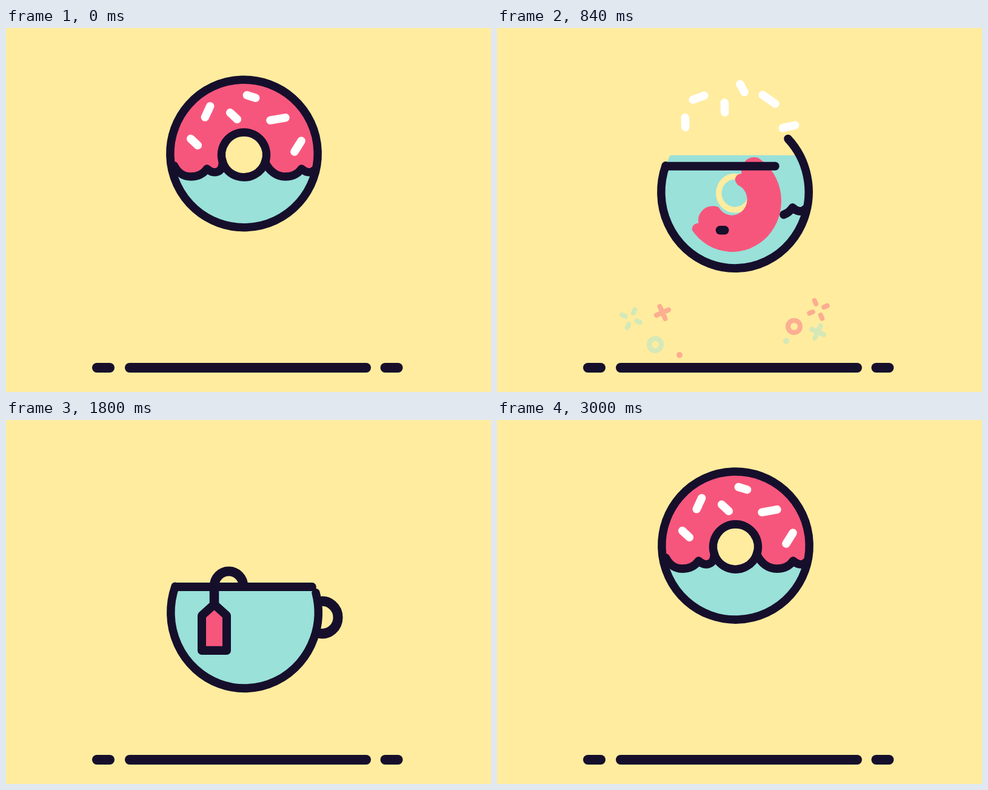
Write an HTML page with a canvas that moves like this. It is 800 px wide and 600 px high and loops after 3040 ms.

```html
<!DOCTYPE html>
<html lang="en">
<head>
<meta charset="utf-8">
<title>Donut and teacup</title>
<style>
html, body { margin: 0; width: 100%; height: 100%; overflow: hidden; background: #ffec9f; }
canvas { display: block; }
</style>
</head>
<body>
<canvas id="stage" width="800" height="600"></canvas>
<script>
const ctx = document.getElementById('stage').getContext('2d');
const BG = '#ffec9f', INK = '#160f2c', PINK = '#f7567c', MINT = '#99e1d9';
const LOOP = 3040, HALF = 1520, RAD = Math.PI / 180, R = 121.7;

const clamp = v => Math.max(0, Math.min(1, v));
const ramp = (t, from, to) => clamp((t - from) / (to - from));
const easeOut = u => 1 - (1 - u) ** 2;

// piecewise linear curve through [time, value] pairs
function curve(t, keys) {
  for (let i = 1; i < keys.length; i++) {
    const [a, va] = keys[i - 1], [b, vb] = keys[i];
    if (t < b) return va + (vb - va) * clamp((t - a) / (b - a));
  }
  return keys[keys.length - 1][1];
}

const icingEdge = `M118 26L112 30Q104 33 95 25C88 35 79 38 68 38C55 38 42 30 35 14
  A37 37 0 1 0 -35 14Q-36 28 -44 30Q-52 33 -61 25C-68 35 -77 38 -88 38C-97 38 -108 34 -115 20`;
const icingLine = new Path2D(icingEdge);
const icingFill = new Path2D(icingEdge + 'A119 119 0 1 1 118 26Z');
const tag = new Path2D('M-29.5 61H-70.5V5L-50 -13L-29.5 5Z');
const string = new Path2D('M-50 -13V-42A24 24 0 0 1 -2 -42');
const handle = new Path2D('M123.5 -17.6A26 26 0 1 1 123.5 33.6');

// x, y, angle, half length, extra jump height
const sprinkles = [
  [-82, -19, 43, 8, 20], [-60, -69, 115, 10, 10], [-17, -62, 43, 8, 0],
  [12, -94, 17, 7.5, 0], [56, -57, -10, 12.7, 20], [89, -12, 122, 10.5, 20]
];

// kind, colour, spin, start angle, then x and y at 80, 440 and 520 ms after impact
const confetti = [
  ['burst', MINT, -1, -12, 284, 221, 207, 512, 479, 482],
  ['cross', PINK, -1, 31, 316, 273, 259, 531, 469, 467],
  ['ring', MINT, 0, 0, 289, 261, 254, 546, 522, 523],
  ['dot', PINK, 0, 0, 331, 301, 296, 555, 539, 536],
  ['cross', MINT, 1, -31, 459, 529, 544, 537, 501, 505],
  ['burst', PINK, 1, 12, 480, 530, 545, 527, 464, 460],
  ['ring', PINK, 0, 0, 444, 490, 503, 537, 492, 491],
  ['dot', MINT, 0, 0, 433, 477, 488, 548, 516, 517]
];

function parabola(s, a, b, c) {
  const d1 = (b - a) / 360, d2 = ((c - b) / 80 - d1) / 440;
  return a + (s - 80) * (d1 + d2 * (s - 440));
}

function line(x1, y1, x2, y2, width, color) {
  ctx.beginPath();
  ctx.moveTo(x1, y1);
  ctx.lineTo(x2, y2);
  ctx.lineWidth = width;
  ctx.strokeStyle = color;
  ctx.stroke();
}

function disc(x, y, r, color) {
  ctx.beginPath();
  ctx.arc(x, y, r, 0, 7);
  ctx.fillStyle = color;
  ctx.fill();
}

// strokes the first part of a path
function trace(path, length, part, width) {
  if (part <= 0) return;
  ctx.lineWidth = width;
  ctx.strokeStyle = INK;
  ctx.setLineDash(part < 1 ? [length * part, 2000] : []);
  ctx.stroke(path);
  ctx.setLineDash([]);
}

function drawConfetti(s) {
  if (s < 0 || s > 660) return;
  ctx.save();
  ctx.beginPath();
  ctx.rect(0, 0, 800, 553);
  ctx.clip();
  ctx.globalAlpha = clamp((660 - s) / 530);
  for (const [kind, color, spin, angle, xa, xb, xc, ya, yb, yc] of confetti) {
    ctx.save();
    ctx.translate(parabola(s, xa, xb, xc), parabola(s, ya, yb, yc));
    ctx.rotate((angle + spin * 0.153 * (s - 80)) * RAD);
    if (kind === 'dot') disc(0, 0, 5, color);
    if (kind === 'ring') {
      ctx.beginPath();
      ctx.arc(0, 0, 10, 0, 7);
      ctx.lineWidth = 8;
      ctx.strokeStyle = color;
      ctx.stroke();
    }
    if (kind === 'cross' || kind === 'burst') {
      ctx.beginPath();
      for (let i = 0; i < 4; i++) {
        const [near, far] = kind === 'cross' ? [0, 11] : [10, 16];
        ctx.moveTo(0, -near);
        ctx.lineTo(0, -far);
        ctx.rotate(Math.PI / 2);
      }
      ctx.lineWidth = 8;
      ctx.strokeStyle = color;
      ctx.stroke();
    }
    ctx.restore();
  }
  ctx.restore();
}

function drawGround(tau) {
  const w = curve(tau, [[400, 0], [440, 1.15], [480, 1], [560, 0.07], [600, 0]]);
  line(204 - 10 * w, 560, 594 + 10 * w, 560, 16, INK);
  line(150 - 2.5 * w, 560, 171 - 2.5 * w, 560, 16, INK);
  line(625.5 + 2.5 * w, 560, 646.5 + 2.5 * w, 560, 16, INK);
}

function pose(t) {
  const back = t >= HALF, tau = t % HALF;
  const sy = curve(tau, [[0, 1], [400, 1.04], [480, 0.934], [560, 1], [840, 1.035],
    [1000, 1.055], [1280, 1.02], [1520, 1]]);
  const leave = back ? 455 : 480;
  const y = tau < leave
    ? 207 + 217 * (tau / 400) ** 1.9
    : 207 + 226 * (1 - (tau - leave) / (HALF - leave)) ** 3;
  return {
    back, tau, sy,
    x: back ? 393.5 : 392.5,
    y: Math.min(y, 553 - 128.5 * sy),
    sx: Math.max(1, 1 + (1 - sy) * 0.94),
    cup: back ? 1 - easeOut(ramp(t, 2035, 2912)) : easeOut(ramp(t, 480, 1131))
  };
}

function drawIcing(t, back, cup) {
  const turn = back ? 1 - easeOut(ramp(t, 2140, 2440)) : cup / 0.8;
  const size = back ? ramp(t, 2140, 2240) : 1 - ramp(t, 840, 1040);
  if (size <= 0) return;
  const away = 1 - size;
  ctx.save();
  ctx.translate(-4 * turn - 46 * away, 13 * turn + 14 * away);
  ctx.rotate(132 * turn * RAD);
  ctx.scale((1 - 0.32 * turn) * size, (1 - 0.32 * turn) * size);
  ctx.fillStyle = PINK;
  ctx.fill(icingFill);
  ctx.restore();
}

function drawTag(t, back) {
  const size = back ? 1 - ramp(t, 2100, 2220) : ramp(t, 900, 1080);
  const outline = back ? ramp(t, 2160, 1910) : ramp(t, 825, 1225);
  if (size > 0) {
    ctx.save();
    ctx.translate(-50, 25);
    ctx.scale(size, size);
    ctx.translate(50, -25);
    ctx.fillStyle = PINK;
    ctx.fill(tag);
    ctx.restore();
  }
  ctx.save();
  if (!back) ctx.translate(13 * (1 - outline), 0);
  trace(tag, 207, outline, 14);
  ctx.restore();
}

function drawBody(t, p) {
  const { back, cup } = p;
  const extras = back ? ramp(t, 2040, 1880) : ramp(t, 1060, 1400);
  ctx.save();
  ctx.translate(p.x, p.y);
  ctx.scale(p.sx, p.sy);

  trace(handle, 91, extras, 16);

  ctx.save();
  ctx.beginPath();
  ctx.rect(-140, -128 + 87 * cup, 280, 300);
  ctx.clip();
  disc(0, 0, R, MINT);
  ctx.restore();

  if (back) {
    const r = 31 * clamp((0.7 - cup) / 0.4);
    if (r > 0) disc(0, 2, r, BG);
  } else if (cup < 0.97) {
    disc(0, 2, 31.5, BG);
    disc(0, 2, 33 * clamp((cup - 0.3) / 0.75), MINT);
  }
  drawIcing(t, back, cup);

  const edge = back ? clamp((0.9 - cup) / 0.73) : clamp(1 - cup * 1.0875);
  trace(icingLine, 343, edge, 13.5);
  const under = back ? clamp(1 - cup / 0.2) : clamp(1 - cup * 3);
  if (under > 0) {
    ctx.beginPath();
    ctx.arc(0, 2, 37, 0.3, 0.3 + (Math.PI - 0.6) * under);
    ctx.lineWidth = 13.5;
    ctx.strokeStyle = INK;
    ctx.stroke();
  }
  const drip = back ? clamp(1 - Math.abs(cup - 0.2) / 0.15) : 0;
  if (drip > 0) line(36.5, 6, 36.5, 6 + 29 * drip, 13.5, INK);

  drawTag(t, back);
  trace(string, 104, extras, 15.5);

  // rim and outer arc
  line(-114.4, -41, -114.4 + 226 * cup, -41, 13.5, INK);
  ctx.beginPath();
  ctx.arc(0, 0, R, 200 * RAD, (145 * cup - 160) * RAD - 0.001, true);
  ctx.stroke();
  ctx.restore();
}

function drawSprinkles(t, p) {
  const up = t < HALF;
  ctx.save();
  if (t > 1016 && t < 2300) {
    ctx.beginPath();
    ctx.rect(0, 0, 800, p.y - 44 * p.sy);
    ctx.clip();
  }
  for (const [x, y, angle, half, jump] of sprinkles) {
    const seated = p.y - 207 + (p.sy - 1) * y;
    let dy = seated, spin = 0;
    if (up && t > 480) {
      dy = 0.00097 * (t - 1016) ** 2 - 44 - jump * Math.sin(Math.PI * ramp(t, 480, 1440));
      spin = -0.375 * (t - 480);
    } else if (!up) {
      const flight = 0.00113 * (t - 2386) ** 2 - 15 - jump * Math.sin(Math.PI * ramp(t, 1640, 2600));
      dy = t > 2386 ? Math.min(flight, seated) : flight;
      spin = 0.375 * Math.min(0, t - 2600);
    }
    ctx.save();
    ctx.translate(p.x + x * p.sx, 207 + y + dy);
    if (t <= 480) ctx.scale(p.sx, p.sy);
    ctx.rotate((angle + spin) * RAD);
    line(-half, 0, half, 0, 13.5, '#fff');
    ctx.restore();
  }
  ctx.restore();
}

function draw(t) {
  const p = pose(t);
  ctx.fillStyle = BG;
  ctx.fillRect(0, 0, 800, 600);
  ctx.lineCap = ctx.lineJoin = 'round';
  drawConfetti(t - (p.back ? 2000 : 400));
  drawBody(t, p);
  drawSprinkles(t, p);
  drawGround(p.tau);
}

const start = performance.now();
function tick() {
  const ms = (performance.now() - start) % LOOP;
  draw(Math.floor(ms / 40) * 40);
  requestAnimationFrame(tick);
}
tick();
</script>
</body>
</html>
```
